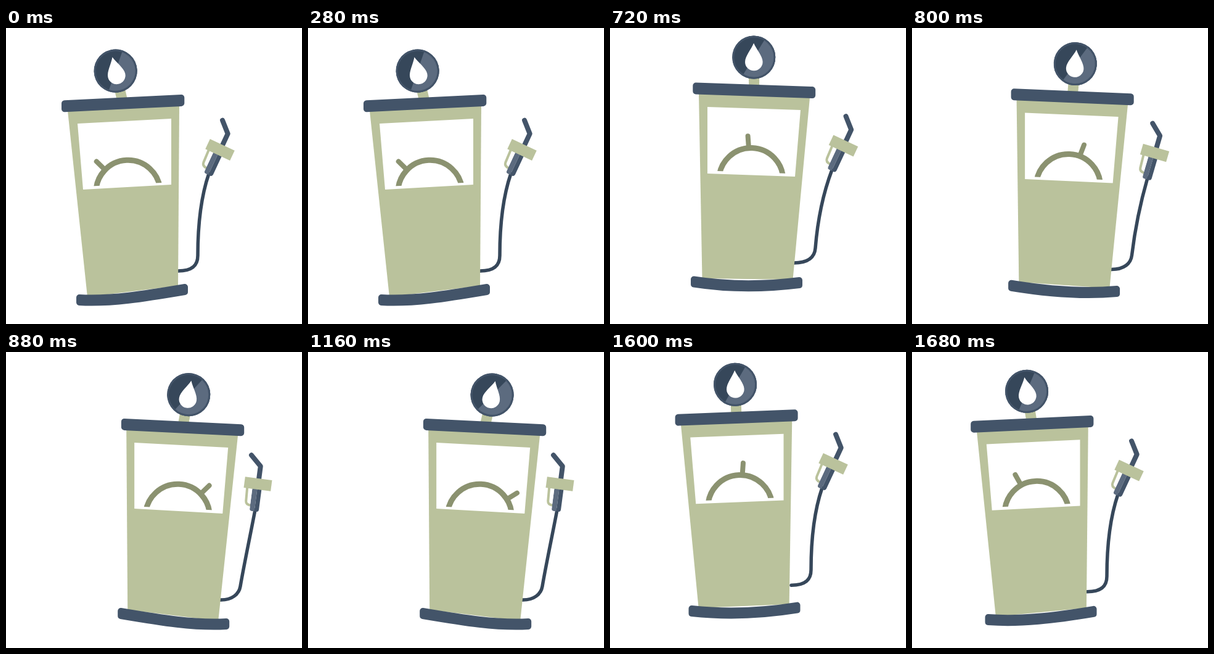
Write an HTML page with a canvas that moves like this. It is 480 px wide and 480 px high and loops after 1.72 s.

```html
<!DOCTYPE html>
<html lang="en">
<head>
<meta charset="utf-8">
<title>Hopping fuel pump</title>
<style>
  html, body { margin: 0; width: 100%; height: 100%; overflow: hidden; background: #fff; }
  canvas { display: block; width: 480px; height: 480px; }
</style>
</head>
<body>
<canvas id="stage" width="480" height="480"></canvas>
<script>
const ctx = document.getElementById('stage').getContext('2d');
const LOOP = 1720, STEP = 40, RAD = Math.PI / 180;
const COLOR = {
  body: '#bac29c', bar: '#435469', dark: '#36475a', light: '#5c6b7f', gauge: '#8b9270'
};

// Cabinet corners run TL, BL, BR, TR so that mirroring is a plain reversal.
const leanLeft = {
  body: [[100, 134], [132, 436], [279, 418], [281, 126]],
  window: [[116, 155], [125, 262], [268, 254], [268, 147]],
  bar: [[95, 126.7], [284.3, 117.4]],
  foot: [[119, 441], [170, 444], [225, 435], [290, 424]],
  gauge: [[198, 266.3]]
};
const hopRight = {
  body: [[144, 107], [149.5, 406], [296.5, 408], [324, 113]],
  window: [[158, 128], [158, 236], [300, 241], [309, 133]],
  bar: [[139.3, 98], [328.2, 104.6]],
  foot: [[136, 411.5], [190, 420], [250, 420], [307, 413]],
  gauge: [[228.7, 246.5]]
};

function mirror(cabinet, axisSum) {
  const flip = points => points.map(([x, y]) => [axisSum - x, y]).reverse();
  return Object.fromEntries(Object.entries(cabinet).map(([k, v]) => [k, flip(v)]));
}

const hoseLeft = [[279, 394], [303, 394], [311, 384], [311, 369], [311, 335], [314, 280], [329, 236]];

const LEFT = { ...leanLeft, nozzle: [347, 197.5, 25], hose: hoseLeft };
const RIGHT = {
  ...mirror(leanLeft, 476.2), nozzle: [408.5, 214, 7.5],
  hose: [[346, 402], [367, 403], [378, 392], [380, 380], [385, 350], [396, 298], [404, 256]]
};
const HOP_RIGHT = {
  ...hopRight, nozzle: [378.5, 191, 25],
  hose: [[298, 381], [322, 381], [332, 371], [333, 357], [336, 320], [343, 275], [360, 230]]
};
const HOP_LEFT = {
  ...mirror(hopRight, 444), nozzle: [367, 176, 25],
  hose: hoseLeft.map(([x, y]) => [x + 20, y - 21])
};

const TIMELINE = [
  [0, LEFT], [600, LEFT], [720, HOP_RIGHT], [880, RIGHT],
  [1480, RIGHT], [1560, HOP_LEFT], [LOOP, LEFT]
];

const progress = (t, from, to) => Math.min(1, Math.max(0, (t - from) / (to - from)));

function mix(a, b, k) {
  if (typeof a === 'number') return a + (b - a) * k;
  if (Array.isArray(a)) return a.map((v, i) => mix(v, b[i], k));
  return Object.fromEntries(Object.keys(a).map(key => [key, mix(a[key], b[key], k)]));
}

function poseAt(t) {
  const i = TIMELINE.findIndex(([end]) => t < end);
  const [from, a] = TIMELINE[i - 1], [to, b] = TIMELINE[i];
  return mix(a, b, progress(t, from, to));
}

function polygon(points, color) {
  ctx.beginPath();
  points.forEach(p => ctx.lineTo(...p));
  ctx.closePath();
  ctx.fillStyle = color;
  ctx.fill();
}

function stroke(color, width, cap = 'round') {
  ctx.strokeStyle = color;
  ctx.lineWidth = width;
  ctx.lineCap = cap;
  ctx.lineJoin = 'round';
  ctx.stroke();
}

function placed(x, y, angle, draw) {
  ctx.save();
  ctx.translate(x, y);
  ctx.rotate(angle);
  draw();
  ctx.restore();
}

// A thick strip with softly rounded corners along a cubic curve.
function band([p0, p1, p2, p3], thickness) {
  const round = 10, h = (thickness - round) / 2;
  const up = ([x, y]) => [x, y - h], down = ([x, y]) => [x, y + h];
  ctx.beginPath();
  ctx.moveTo(...up(p0));
  ctx.bezierCurveTo(...up(p1), ...up(p2), ...up(p3));
  ctx.lineTo(...down(p3));
  ctx.bezierCurveTo(...down(p2), ...down(p1), ...down(p0));
  ctx.closePath();
  ctx.fillStyle = COLOR.bar;
  ctx.fill();
  stroke(COLOR.bar, round);
}

function drawHose([start, ...rest]) {
  ctx.beginPath();
  ctx.moveTo(...start);
  ctx.bezierCurveTo(...rest.slice(0, 3).flat());
  ctx.bezierCurveTo(...rest.slice(3).flat());
  stroke(COLOR.dark, 5.5);
}

function drawNozzle() {
  ctx.beginPath();
  ctx.moveTo(-16.5, -45);
  ctx.lineTo(0.5, -29);
  ctx.lineTo(0.5, 0);
  stroke(COLOR.bar, 8);

  ctx.beginPath();
  ctx.moveTo(-16.5, 6);
  ctx.lineTo(-15.5, 30);
  ctx.quadraticCurveTo(-15, 36, -7, 36);
  stroke(COLOR.body, 4);

  ctx.save();
  ctx.beginPath();
  ctx.roundRect(-8, 0, 15, 45, 4);
  ctx.clip();
  ctx.fillStyle = COLOR.light;
  ctx.fillRect(-8, 0, 8, 45);
  ctx.fillStyle = COLOR.bar;
  ctx.fillRect(0, 0, 8, 45);
  ctx.restore();

  ctx.fillStyle = COLOR.body;
  ctx.fillRect(-22, -9, 44, 18);
}

function drawGauge(needle) {
  const radius = 52;
  ctx.save();
  ctx.beginPath();
  ctx.rect(-90, -90, 180, 77.3);
  ctx.clip();
  ctx.beginPath();
  ctx.arc(0, 0, radius, Math.PI, 0);
  stroke(COLOR.gauge, 9, 'butt');
  ctx.restore();

  ctx.rotate(needle);
  ctx.beginPath();
  ctx.moveTo(0, -radius);
  ctx.lineTo(0, -71.5);
  stroke(COLOR.gauge, 8);
}

// Drawn around the middle of the top bar, with the globe on its stem above.
function drawGlobe() {
  const radius = 35;
  ctx.fillStyle = COLOR.body;
  ctx.fillRect(-8.5, -30, 17, 30);
  ctx.translate(0, -53.8);

  ctx.beginPath();
  ctx.arc(0, 0, radius, 0, Math.PI * 2);
  ctx.fillStyle = COLOR.dark;
  ctx.fill();
  ctx.beginPath();
  ctx.arc(0, 0, radius, -58 * RAD, 122 * RAD);
  ctx.fillStyle = COLOR.light;
  ctx.fill();
  ctx.beginPath();
  ctx.arc(0, 0, radius - 1.5, 0, Math.PI * 2);
  stroke(COLOR.bar, 3);

  ctx.beginPath();
  ctx.moveTo(0, -23);
  ctx.bezierCurveTo(4, -13, 14.3, -2, 14.3, 7.5);
  ctx.arc(0, 7.5, 14.3, 0, Math.PI);
  ctx.bezierCurveTo(-14.3, -2, -4, -13, 0, -23);
  ctx.fillStyle = '#fff';
  ctx.fill();
}

function draw(t) {
  const pose = poseAt(t);
  const [a, b] = pose.bar;
  const tilt = Math.atan2(b[1] - a[1], b[0] - a[0]);
  // The needle and globe trail the cabinet with their own steady swing.
  const swing = progress(t, 600, 920) - progress(t, 1480, LOOP);
  const needle = mix(-43, 55.4, swing) * RAD;
  const sway = mix(-10.1, 10.1, swing) * RAD;
  const [nx, ny, nAngle] = pose.nozzle;

  ctx.fillStyle = '#fff';
  ctx.fillRect(0, 0, 480, 480);

  drawHose(pose.hose);
  placed(nx, ny, nAngle * RAD, drawNozzle);
  placed(...mix(a, b, 0.5), tilt + sway, drawGlobe);
  polygon(pose.body, COLOR.body);
  polygon(pose.window, '#fff');
  placed(...pose.gauge[0], tilt, () => drawGauge(needle));
  band([a, mix(a, b, 1 / 3), mix(a, b, 2 / 3), b], 19);
  band(pose.foot, 18);
}

const start = performance.now();
function tick() {
  const t = (performance.now() - start) % LOOP;
  draw(Math.floor(t / STEP) * STEP);
  requestAnimationFrame(tick);
}
tick();
</script>
</body>
</html>
```
